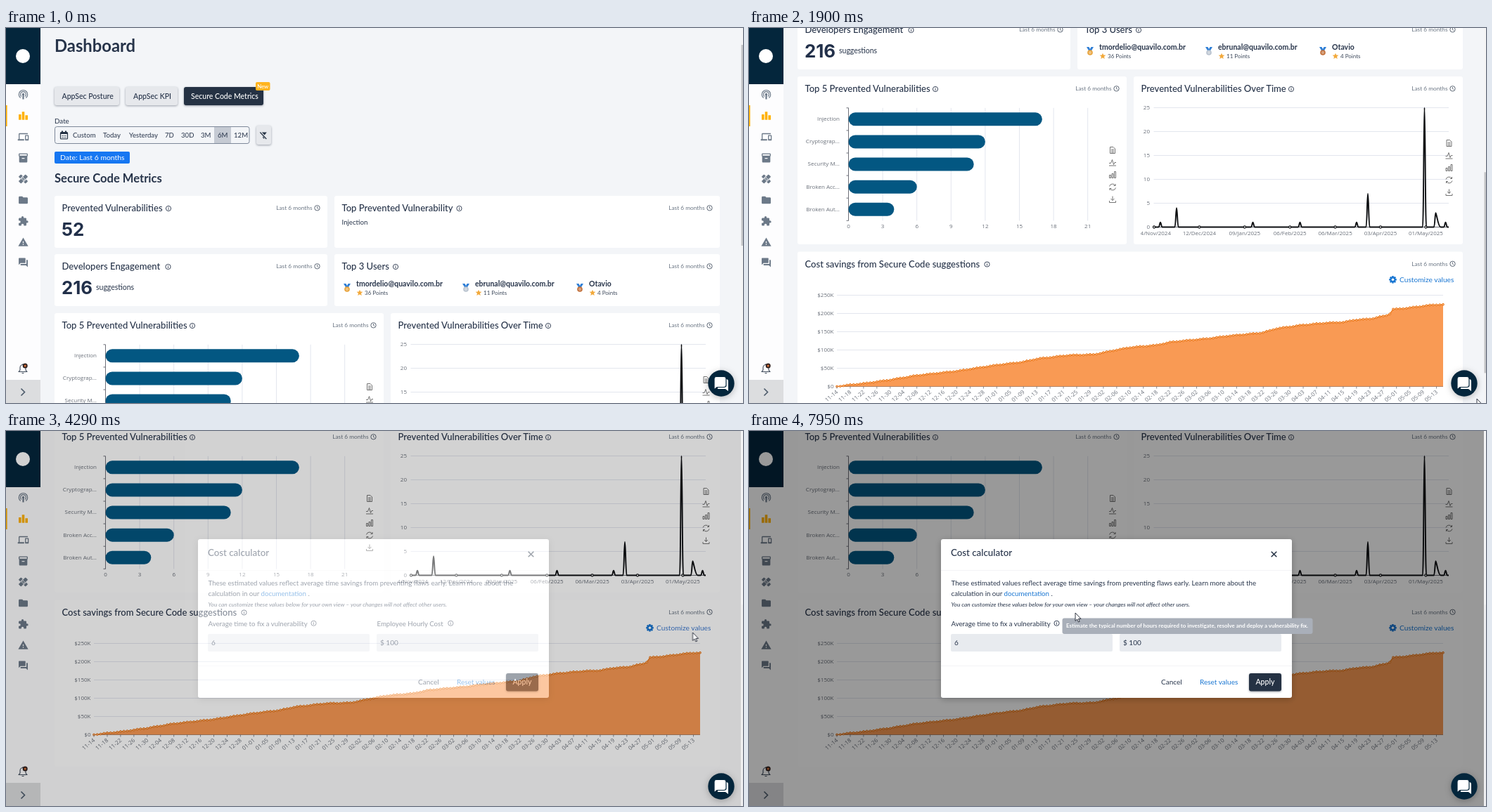
Animation, 1048 px wide and 534 px high, one loop 8000 ms. Source, as an HTML page:

```html
<!DOCTYPE html>
<html lang="en">
<head>
<meta charset="utf-8">
<title>Dashboard</title>
<style>
@property --s { syntax: "<number>"; inherits: true; initial-value: 0; }
html, body { margin: 0; width: 100%; height: 100%; overflow: hidden; }
svg { display: block; width: 1048px; height: 534px; animation: scroll 8s step-end infinite; }
text { font-family: Lato, "Open Sans", sans-serif; white-space: pre; }
.ch { font-family: "Open Sans", "Noto Sans", sans-serif; font-size: 8px; fill: #6a707a; }
.num { font-family: Inter, sans-serif; }
.r { text-anchor: end; }
.m { text-anchor: middle; }
.sh { filter: drop-shadow(0 1px 1.5px rgba(20, 30, 50, .4)); }
.big { filter: drop-shadow(0 2px 5px rgba(0, 0, 0, .25)); }
#content { transform: translateY(calc(var(--s) * -1px)); }
#thumb { transform: translateY(calc(var(--s) * .538px)); animation: thumb 8s step-end infinite; }
#page { animation: page 8s step-end infinite; }
#hover { animation: hover 8s step-end infinite; }
#link { animation: link 8s step-end infinite; }
#modal { animation: modal 8s step-end infinite; }
#tip { animation: tip 8s step-end infinite; }
#hint { animation: hint 8s step-end infinite; }
#cursor { animation: cursor 8s linear infinite; }
@keyframes scroll {
  0% { --s: 0; }
  12.625% { --s: 5; } 13.5% { --s: 31; } 14.375% { --s: 74; } 15.125% { --s: 120; }
  16% { --s: 160; } 16.875% { --s: 188; } 17.75% { --s: 197; }
  20.25% { --s: 203; } 21.125% { --s: 225; } 22% { --s: 259; } 22.875% { --s: 298; }
  23.75% { --s: 337; } 24.625% { --s: 382; } 25.5%, 100% { --s: 415; }
}
@keyframes page { 0% { fill: #f3f5f8; } 50.5%, 100% { fill: #fdfdfe; } }
@keyframes thumb { 0% { fill: #c3c4c7; } 50.5%, 100% { fill: #ededef; } }
@keyframes hover { 0% { opacity: 0; } 43.5% { opacity: .5; } 44.375% { opacity: 1; } 52.75%, 100% { opacity: 0; } }
@keyframes link { 0% { fill: #1976d2; } 48.75% { fill: #3f7bd0; } 59.5%, 100% { fill: #1976d2; } }
@keyframes modal {
  0% { opacity: 0; } 52.75% { opacity: .15; } 53.625% { opacity: .45; } 54.5% { opacity: .75; }
  55.25% { opacity: .92; } 56.125% { opacity: .98; } 57%, 100% { opacity: 1; }
}
@keyframes tip {
  0% { opacity: 0; } 73.5% { opacity: .2; } 74.375% { opacity: .5; } 75.25% { opacity: .8; }
  76.125% { opacity: .95; } 77%, 100% { opacity: 1; }
}
@keyframes hint { 0% { opacity: 0; } 80.375% { opacity: 1; } 98.5%, 100% { opacity: 0; } }
@keyframes cursor {
  0% { transform: translate(1035px, 535px); }
  4.125% { transform: translate(1035px, 535px); animation-timing-function: steps(2, jump-both); }
  5.75% { transform: translate(1035px, 528px); }
  34.625% { transform: translate(1035px, 528px); animation-timing-function: steps(11, jump-both); }
  44.375% { transform: translate(976.5px, 287px); }
  62.125% { transform: translate(976.5px, 287px); animation-timing-function: steps(4, jump-both); }
  65.625% { transform: translate(760px, 302px); }
  66.5% { transform: translate(760px, 302px); animation-timing-function: steps(3, jump-both); }
  69.125% { transform: translate(500px, 245px); }
  70% { transform: translate(500px, 245px); animation-timing-function: steps(2, jump-both); }
  71.75% { transform: translate(433px, 261px); }
  72.625% { transform: translate(433px, 261px); animation-timing-function: steps(5, jump-both); }
  77% { transform: translate(438px, 274px); animation-timing-function: step-end; }
  98.5% { transform: translate(450px, 267px); animation-timing-function: step-end; }
  99.375%, 100% { transform: translate(464px, 259px); }
}
</style>
</head>
<body>
<svg viewBox="0 0 1048 534">
  <rect id="page" width="1048" height="534" fill="#f3f5f8"/>
  <g id="content"></g>
  <g id="side"></g>
  <g id="modal"></g>
  <g id="chat">
    <circle class="big" cx="1017" cy="506" r="18.7" fill="#04263c"/>
    <path d="M1012 500h12a3 3 0 0 1 3 3v14l-4-3h-11z" fill="#fff"/>
    <path d="M1010 496.500h11a3 3 0 0 1 3 3v9a3 3 0 0 1-3 3h-10l-4 3.500v-15.500a3 3 0 0 1 3-3z" fill="#fff" stroke="#04263c" stroke-width="1.200"/>
  </g>
  <rect x="1045" width="3" height="534" fill="#f4f4f5"/>
  <rect id="thumb" x="1045.500" y="24" width="2.500" height="286" fill="#c3c4c7"/>
  <g id="tip"></g>
  <g id="hint"></g>
  <path id="cursor" d="M0 0V11.500L2.700 9L4.400 13L6.200 12.200L4.500 8.400H8Z" fill="#fff" stroke="#1c2230" stroke-width=".9"/>
</svg>
<script>
const INK = '#27344a', DARK = '#253244', GREY = '#6b7684', SLATE = '#6c7988', BLUE = '#1976d2', NAVY = '#04263c';
const put = (id, ...parts) => { document.getElementById(id).innerHTML = parts.flat(9).join(''); };

const text = (x, y, size, str, fill = INK, more = '') =>
  `<text x="${x}" y="${y}" font-size="${size}" fill="${fill}" ${more}>${str}</text>`;
const label = (x, y, str, cls = '', more = '') => `<text class="ch ${cls}" x="${x}" y="${y}" ${more}>${str}</text>`;
const box = (x, y, x2, y2, fill, r = 0, more = '') =>
  `<rect x="${x}" y="${y}" width="${x2 - x}" height="${y2 - y}" rx="${r}" fill="${fill}" ${more}/>`;
const dot = (x, y, r, fill, more = '') => `<circle cx="${x}" cy="${y}" r="${r}" fill="${fill}" ${more}/>`;
const line = (d, color, w = 1, more = '') =>
  `<path d="${d}" fill="none" stroke="${color}" stroke-width="${w}" ${more}/>`;
const at = (x, y, ...parts) => `<g transform="translate(${x} ${y})">${parts.flat(9).join('')}</g>`;
const icon = (d, x, y, size, fill) =>
  `<path d="${d}" fill="${fill}" fill-rule="evenodd" transform="translate(${x - size / 2} ${y - size / 2}) scale(${size / 24})"/>`;
const range = n => [...Array(n).keys()];
const bold = 'font-weight="700"', medium = 'font-weight="500"';

const info = (x, y) => at(x, y, dot(0, 0, 3.6, 'none', `stroke="${INK}" stroke-width=".9"`),
  line('M0-.5V2M0-2V-1.100', INK, .9));
const clock = (x, y) => at(x, y, dot(0, 0, 3.7, 'none', `stroke="#4d5868" stroke-width=".9"`),
  line('M0-2.300V.2L1.800 1.300', '#4d5868', .8));
const gear = (x, y) => at(x, y,
  range(4).map(i => `<path d="M0-5.300V5.300" stroke="${BLUE}" stroke-width="2.500" transform="rotate(${i * 45})"/>`),
  dot(0, 0, 4, BLUE), dot(0, 0, 1.8, '#fff'));

// Card with title, info mark and period
const card = (x, y, x2, y2, title, infoX) => [
  box(x, y, x2, y2, '#fff', 3),
  text(x + 10.5, y + 22, 13.05, title, INK, medium), info(infoX, y + 18),
  text(x2 - 21.5, y + 20, 8.3, 'Last 6 months', GREY, 'class="r"'), clock(x2 - 14.5, y + 17.3)];

const button = (x, y, x2, y2, str, tx, bg, fg) =>
  [box(x, y, x2, y2, bg, 3, 'class="sh"'), text(tx, (y + y2) / 2 + 4, 10.5, str, fg, medium)];

const user = (x, name, points, metal) => [
  at(x - 13, 370, `<path d="M-5-6H-1.500L0-3L1.500-6H5L1.500 0H-1.500Z" fill="#2f7fd6"/>`, dot(0, 2, 3.8, metal),
    dot(0, 2, 2.2, '#fff', 'opacity=".35"')),
  text(x, 368, 10.5, name, INK, bold),
  icon('M12 17.270 18.180 21l-1.640-7.030L22 9.240l-7.190-.61L12 2 9.190 8.630 2 9.240l5.460 4.730L5.820 21z', x + 5, 377, 10.5, '#f2a93b'),
  text(x + 12, 380, 8, points + ' Points', '#3e4a5c')];

const tools = (x, y) => [
  'M-3.500-4.500h4.500l2.500 2.500v6.500h-7zM-2-1h4M-2 1h4M-2 3h4',
  'M-5 4.500h10M-5 1h2.500l2-5l2 7l1.500-3h2',
  'M-4.500 4.500v-4h2v4zM-1 4.500v-6h2v6zM2.500 4.500v-9h2v9z',
  'M-4.500-1a4.600 4.600 0 0 1 8.500-1M4.500 1a4.600 4.600 0 0 1-8.500 1M4-4.500v2.500h-2.500M-4 4.500v-2.500h2.500',
  'M-4.500 2v2.500h9v-2.500M0-4.500v6M-2.500-1l2.500 2.500l2.500-2.500'
].map((d, i) => at(x, y + i * 17.5, line(d, '#666', .9)));

function barChart() {
  const X = v => 141.5 + v * 16.2, top = 450.8, pitch = 32.1;
  const rows = [['Injection', 17], ['Cryptograp...', 12], ['Security M...', 11], ['Broken Acc...', 6], ['Broken Aut...', 4]];
  return [
    range(8).map(i => [line(`M${X(i * 3)} ${top}V611.500`, '#e3e6ee'), label(X(i * 3), 622, i * 3, 'm')]),
    line(`M141.500 ${top}V611.500` + range(6).map(i => `M138.500 ${top + i * pitch}h3`).join(''), '#6e7079'),
    rows.map(([name, v], i) => {
      const y = top + (i + .5) * pitch;
      return [box(X(0), y - 9.5, X(v), y + 9.5, '#035782', 9.5), label(129, y + 2.4, name, 'r')];
    }),
    tools(517, 511)];
}

function timeChart() {
  const base = 620.5, Y = v => base - v * 6.8;
  const days = ['14/Nov/2024', '12/Dec/2024', '09/Jan/2025', '06/Feb/2025', '06/Mar/2025', '03/Apr/2025', '01/May/2025'];
  const spikes = [[585, 1], [608, 4], [716.5, 1], [783.5, 1], [864, 1], [880, 7], [960.5, 25], [976.5, 3, 7], [990.5, 1]];
  const d = spikes.map(([x, v, tail = 2.6]) =>
    `L${x - 2.6} ${base}C${x - 1.2} ${base} ${x - 1} ${Y(v)} ${x} ${Y(v)}S${x + tail / 2} ${base} ${x + tail} ${base}`).join('');
  return [
    range(6).map(i => [line(`M575.500 ${Y(i * 5)}H995`, i ? '#e3e6ee' : '#6e7079'), label(570, Y(i * 5) + 2.5, i * 5, 'r')]),
    line(`M575.500 ${base}${d}H995`, '#0b0d10', 1.9, 'stroke-linejoin="round"'),
    `<clipPath id="clip"><rect x="557" y="600" width="450" height="45"/></clipPath><g clip-path="url(#clip)">`,
    days.map((day, i) => {
      const x = 576 + i * 64.4;
      return [dot(x, base, 1.6, '#fff', 'stroke="#0b0d10" stroke-width="1.100"'), label(x, 631.8, day, 'm')];
    }),
    '</g>', tools(995.5, 501)];
}

function costChart() {
  const base = 847.5, step = 862 / 182;
  // Knots: x and height above the axis
  const knots = [[125, 0], [145, 2.5], [165, 4.5], [201, 9.5], [237, 15.5], [296, 22], [352, 30.5], [390, 35], [410, 39.5],
    [455, 44.5], [490, 45.5], [522, 52], [541, 55.5], [580, 59], [601, 63.5], [655, 68.5], [677, 71.5], [730, 76.5], [750, 82.5],
    [787, 87.5], [820, 90.5], [845, 91.5], [860, 94.5], [885, 96.5], [910, 102], [916, 110], [935, 111.5], [950, 113.5], [975, 116.5], [987, 116.5]];
  const height = x => {
    const k = Math.max(1, knots.findIndex(p => p[0] >= x - .01)), [a, b] = [knots[k - 1], knots[k]];
    return a[1] + (b[1] - a[1]) * (x - a[0]) / (b[0] - a[0]);
  };
  const pts = range(183).map(i => {
    const x = Math.min(987, 125 + i * step);
    return [x, base - height(x) + .35 * Math.sin(i * 1.3)];
  });
  const path = pts.map(p => p.map(v => v.toFixed(1)).join(' ')).join('L');
  return [
    range(6).map(i => [line(`M125 ${base - i * 26}H987`, i ? '#e3e6ee' : '#6e7079'),
      label(120.5, base - i * 26 + 2.5, i ? `$${i * 50}K` : '$0', 'r')]),
    `<path d="M125 ${base}L${path}V${base}Z" fill="#f99a54"/>`,
    line('M' + path, '#ee7a1a', 1.3),
    pts.map(([x, y]) => dot(x.toFixed(1), y.toFixed(1), 1.4, '#fbc194', 'stroke="#ea7312" stroke-width="1"')),
    line(range(46).map(i => `M${125 + i * 4 * step} ${base}v3`).join(''), '#6e7079', .8),
    range(46).map(i => {
      const day = new Date(Date.UTC(2024, 10, 14 + 4 * i)).toISOString().slice(5, 10);
      return label(0, 2.5, day, 'r', `transform="translate(${125.5 + i * 4 * step} 854.500) rotate(-40)"`);
    })];
}

const periods = [['Custom', 95], ['Today', 138], ['Yesterday', 175], ['7D', 226], ['30D', 249], ['3M', 277], ['6M', 301], ['12M', 324]];

put('content',
  text(69, 34, 23.8, 'Dashboard', INK, bold),
  button(69, 84, 161, 110, 'AppSec Posture', 79.5, '#e6e8ec', INK),
  button(170, 84, 244, 110, 'AppSec KPI', 181, '#e6e8ec', INK),
  button(253, 84, 366, 110, 'Secure Code Metrics', 263, DARK, '#fff'),
  box(355, 77, 375.5, 89, '#ffb41f', 2), text(365.2, 86, 7.8, 'New', '#fff', 'class="m" ' + medium),
  text(69, 136, 9.8, 'Date'),
  box(296, 141, 320, 164.5, '#c5cad3'),
  box(69.5, 140.5, 346, 164.5, 'none', 3, 'stroke="#7d8899"'),
  box(77.5, 148.5, 87.5, 158, 'none', 1, `stroke="${DARK}" stroke-width="1.200"`),
  line('M77.500 150H87.500M80 146.500V149M85 146.500V149', DARK, 2),
  line('M79.500 153.500h6M79.500 156h6', DARK, 1.2, 'stroke-dasharray="1.500 .8"'),
  periods.map(([p, x]) => text(x, 156, 9.6, p)),
  box(356, 139, 377, 166, '#e6e8ec', 3, 'class="sh"'),
  at(366.3, 153, `<path d="M-4.500-4.500h9l-3.500 4.500v5l-2-1.500v-3.500z" fill="${DARK}"/>`,
    line('M-5-5l9.500 10', '#e6e8ec', 3), line('M-5-4.500l9 9.500', DARK, 1.2)),
  box(69, 176, 176, 193, '#1677f2', 2), text(77, 187.8, 10.4, 'Date: Last 6 months', '#fff'),
  text(69, 220, 16.6, 'Secure Code Metrics', INK, bold),
  card(69, 239, 457, 313, 'Prevented Vulnerabilities', 231),
  text(79, 295.5, 25.8, '52', '#22304a', 'class="num" ' + bold),
  card(467, 239, 1015, 313, 'Top Prevented Vulnerability', 644.5),
  text(477.5, 279.5, 9.7, 'Injection'),
  card(69, 322, 457, 396, 'Developers Engagement', 230.5),
  text(79, 378.5, 25.8, '216', '#22304a', 'class="num" ' + bold),
  text(128, 373, 10.5, 'suggestions'),
  card(467, 322, 1015, 396, 'Top 3 Users', 554),
  user(498, 'tmordelio@quavilo.com.br', 36, '#e8a33a'),
  user(667, 'ebrunal@quavilo.com.br', 11, '#b9c3cf'),
  user(829, 'Otavio', 4, '#c2703a'),
  card(69, 406, 537, 645, 'Top 5 Prevented Vulnerabilities', 265), barChart(),
  card(547, 406, 1015, 645, 'Prevented Vulnerabilities Over Time', 771), timeChart(),
  card(69, 655.5, 1015, 893, 'Cost savings from Secure Code suggestions', 338.5),
  box(907, 686, 1005, 705, '#e5eefa', 2, 'id="hover"'),
  gear(915.5, 695.3), text(925, 699, 10.2, 'Customize values', BLUE, 'id="link"'),
  costChart());

const nav = {
  155: 'M4 6h18V4H4c-1.100 0-2 .9-2 2v11H0v3h14v-3H4V6zm19 2h-6c-.55 0-1 .45-1 1v10c0 .55.45 1 1 1h6c.55 0 1-.45 1-1V9c0-.55-.45-1-1-1zm-1 9h-4v-7h4v7z',
  185: 'M20 2H4c-1 0-2 .9-2 2v3c0 .72.43 1.340 1 1.700V20c0 1.100 1.100 2 2 2h14c.9 0 2-.9 2-2V8.700c.57-.35 1-.97 1-1.700V4c0-1.100-1-2-2-2zm-5 12H9v-2h6v2zm5-7H4V4h16v3z',
  245: 'M10 4H4c-1.100 0-2 .9-2 2v12c0 1.100.9 2 2 2h16c1.100 0 2-.9 2-2V8c0-1.100-.9-2-2-2h-8l-2-2z',
  275: 'M20.500 11H19V7c0-1.100-.9-2-2-2h-4V3.500a2.500 2.500 0 0 0-5 0V5H4c-1.100 0-2 .9-2 2v3.800h1.500a2.700 2.700 0 0 1 0 5.400H2V20c0 1.100.9 2 2 2h3.800v-1.500a2.700 2.700 0 0 1 5.400 0V22H17c1.100 0 2-.9 2-2v-4h1.500a2.500 2.500 0 0 0 0-5z',
  305: 'M1 21h22L12 2 1 21zm12-3h-2v-2h2v2zm0-4h-2v-4h2v4z',
  334: 'M21 6h-2v9H6v2c0 .55.45 1 1 1h11l4 4V7c0-.55-.45-1-1-1zm-4 6V3c0-.55-.45-1-1-1H3c-.55 0-1 .45-1 1v14l4-4h10c.55 0 1-.45 1-1z'
};

put('side',
  box(0, 0, 49, 534, '#fdfdfe'), box(0, 0, 49, 80, NAVY), dot(24, 40, 10, '#fff'),
  box(0, 110, 1.6, 140, '#ffb100'),
  at(24.5, 95, dot(0, -.5, 1.7, SLATE), line('M0 .5V6.500', SLATE, 2.2),
    line('M-2.600 2.500A3.900 3.900 0 1 1 2.600 2.500M-3.800 4.600A6.200 6.200 0 1 1 3.800 4.600', SLATE, 1.2)),
  icon('M7.500 21H2V9h5.500v12zm7.250-18h-5.500v18h5.500V3zM22 11h-5.500v10H22V11z', 24.5, 125, 15.5, '#ffb100'),
  Object.entries(nav).map(([y, d]) => icon(d, 24.5, +y, 15.5, SLATE)),
  at(24.5, 215, [45, -45].map(a => `<rect x="-7.500" y="-3" width="15" height="6" rx="1.500" fill="${SLATE}" stroke="#fdfdfe" transform="rotate(${a})"/>`),
    [[-1.8, 0], [1.8, 0], [0, -1.8], [0, 1.8]].map(([x, y]) => dot(x, y, .8, '#fdfdfe'))),
  at(24, 485, line('M-6 4.500h12l-2-2.300v-3.700a4 4 0 0 0-8 0v3.700zM-1.500 6.500h3M0-5.500v-1.500', '#3c4858', 1.1, 'stroke-linejoin="round"')),
  dot(27.2, 481, 3.5, '#33231f'), dot(27.2, 481, 1.5, '#e0763c'),
  box(0, 501, 49, 534, '#dcdddf'),
  line('M21.500 513.500l5 5l-5 5', '#4c5a6b', 1.6));

const field = (x, title, infoX, value) => [
  text(x + .5, 277.5, 9.65, title), info(infoX, 273.8),
  box(x, 289, x + 230, 314, '#e8ebef', 2), text(x + 5, 305.3, 10, value)];

put('modal',
  box(0, 0, 1045, 534, '#000', 0, 'opacity=".4"'),
  box(273, 154, 772, 380, '#fff', 3, 'class="big"'),
  line('M273 198.500H772M273 334.500H772', '#f3f4f6'),
  text(287, 178, 13.3, 'Cost calculator', INK, medium),
  line('M742.700 171.700l7.600 7.600m0-7.600l-7.600 7.600', DARK, 1.5),
  text(287.5, 220, 9.7, 'These estimated values reflect average time savings from preventing flaws early. Learn more about the'),
  text(287.5, 234.5, 9.7, `calculation in our <tspan fill="${BLUE}">documentation</tspan> .`),
  text(287.5, 249.8, 8.4, 'You can customize these values below for your own view – your changes will not affect other users.', INK, 'font-style="italic"'),
  field(287, 'Average time to fix a vulnerability', 437.5, '6'),
  field(527, 'Employee Hourly Cost', 632.3, '$ 100'),
  text(586, 361, 10, 'Cancel'), text(641, 361, 10, 'Reset values', BLUE),
  box(711, 345, 757, 370.5, DARK, 3, 'class="sh"'),
  text(734, 361.3, 10.6, 'Apply', '#fff', 'class="m" ' + medium));

put('tip', box(445.5, 266.5, 801.5, 289, '#a9afb9', 3),
  text(451, 280, 7.92, 'Estimate the typical number of hours required to investigate, resolve and deploy a vulnerability fix.', '#fff', bold));
put('hint', box(445.5, 286, 510, 302, '#111'),
  label(450, 296.8, 'Cost calculator', '', 'style="fill:#fff"'));
</script>
</body>
</html>
```
